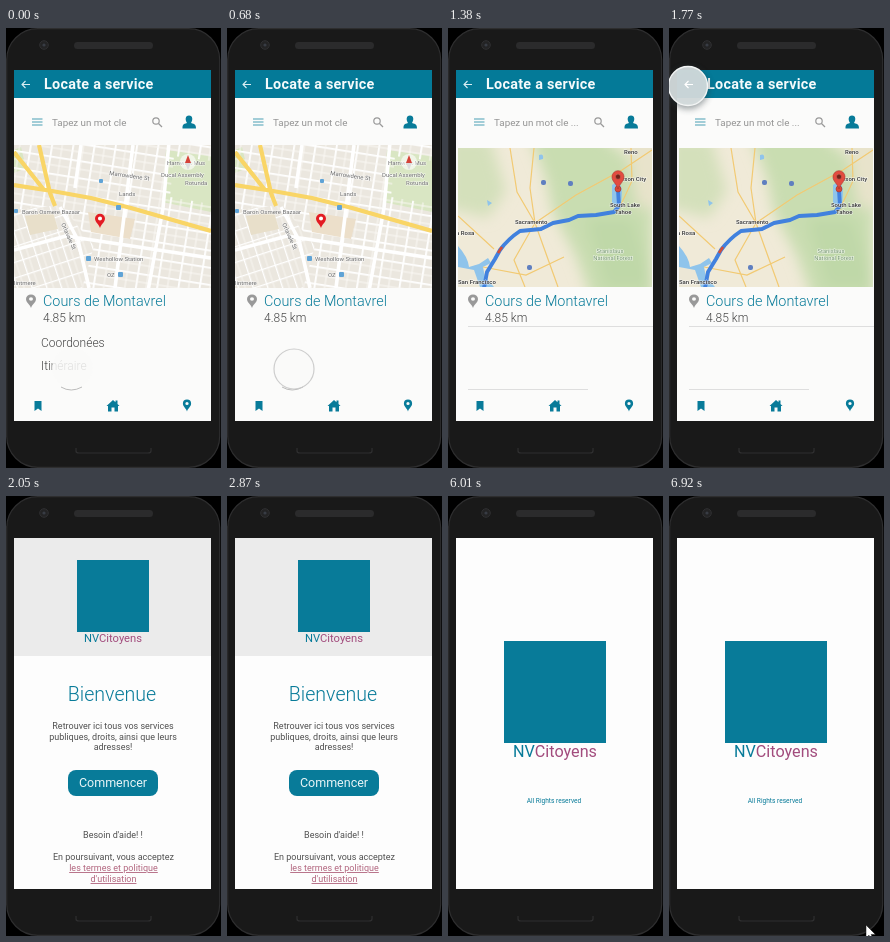
Recreate the animation shown at these times as an HTML page. Size 215 by 440 pixels, loop 8 s.

```html
<!DOCTYPE html>
<html lang="fr">
<head>
<meta charset="utf-8">
<title>Locate a service</title>
<style>
html, body { margin: 0; width: 100%; height: 100%; overflow: hidden; background: #000; }
svg.stage { display: block; width: 100vw; height: 100vh; }
text { font-family: Roboto, "Open Sans", sans-serif; }

.teal { fill: #087b99; }
.plum { fill: #a24c7d; }
.label { font-size: 6px; fill: #6b6b6b; paint-order: stroke; stroke: #fff; stroke-width: 1.2px; stroke-opacity: .7; }
.city { font-weight: 500; fill: #333; }
.forest { fill: #71936c; text-anchor: middle; font-size: 5.8px; }
.body { font-size: 9px; fill: #505050; text-anchor: middle; }
.link { fill: #b2667f; text-decoration: underline; }
.row { font-size: 12px; fill: #454545; }
.brand { text-anchor: middle; }

/* Every change is a hard cut on one shared clock */
.cut { animation: 8s step-end infinite; visibility: hidden; }
.service { animation-name: service; }
.city-map { animation-name: city-map; }
.route-map { animation-name: route-map; }
.rows { animation-name: rows; }
.press { animation-name: city-map; }
.press-rim { animation-name: press-rim; }
.ring { animation-name: ring; }
.back-tap { animation-name: back-tap; }
.welcome { animation-name: welcome; }
.splash { animation-name: splash; }
.cursor { animation-name: cursor; }
@keyframes service { 0% { visibility: visible } 25.625% { visibility: hidden } }
@keyframes city-map { 0% { visibility: visible } 11.875% { visibility: hidden } }
@keyframes route-map { 0% { visibility: hidden } 11.875% { visibility: visible } 25.625% { visibility: hidden } }
@keyframes rows { 0% { visibility: visible } 8.5% { visibility: hidden } }
@keyframes press-rim { 0% { visibility: hidden } 3.375% { visibility: visible; stroke-opacity: .45 } 8.5% { visibility: visible; stroke-opacity: .9 } 11.875% { visibility: hidden } }
@keyframes ring { 0% { visibility: hidden } 11.875% { visibility: visible } 14% { visibility: hidden } }
@keyframes back-tap { 0% { visibility: hidden } 22.125% { visibility: visible } 25.625% { visibility: hidden } }
@keyframes welcome { 0% { visibility: hidden } 25.625% { visibility: visible } 75.125% { visibility: hidden } }
@keyframes splash { 0% { visibility: hidden } 75.125% { visibility: visible } }
@keyframes cursor {
  0% { visibility: hidden; transform: translate(88px, 434px) }
  81.875% { visibility: visible; transform: translate(88px, 433px) }
  83.4% { visibility: visible; transform: translate(140px, 432px) }
  85% { visibility: visible; transform: translate(179px, 430px) }
  86.5%, 100% { visibility: visible; transform: translate(197px, 429px) }
}
</style>
</head>
<body>
<svg class="stage" viewBox="0 0 215 440" preserveAspectRatio="none">
<defs>
  <pattern id="blocks" width="21" height="17" patternUnits="userSpaceOnUse" patternTransform="rotate(9)">
    <path d="M0 0H21M0 0V17" stroke="#fff" stroke-width="3.6"/>
    <path d="M0 9H21M11 0V17" stroke="#faf8f4" stroke-width="1"/>
  </pattern>
  <pattern id="lanes" width="14" height="15" patternUnits="userSpaceOnUse" patternTransform="rotate(-18)">
    <path d="M0 0H14M0 0V15" stroke="#fff" stroke-width="2.6"/>
    <path d="M7 0V15" stroke="#faf8f4" stroke-width=".8"/>
  </pattern>
  <clipPath id="city-box"><path d="M8 117H205V260H8Z"/></clipPath>
  <clipPath id="route-box"><path d="M10 120H204V259H10Z"/></clipPath>
  <filter id="soft" x="-50%" y="-50%" width="200%" height="200%"><feGaussianBlur stdDeviation="3"/></filter>
  <filter id="haze" x="-30%" y="-30%" width="160%" height="160%"><feGaussianBlur stdDeviation="7"/></filter>
  <path id="pin" d="M0 0C-1-4-5-6-5-10A5 5 0 0 1 5-10C5-6 1-4 0 0ZM0-12A2 2 0 0 0 0-8A2 2 0 0 0 0-12Z" fill-rule="evenodd"/>
  <path id="back" d="M24 56.5H16M19.5 53L16 56.5L19.5 60" fill="none" stroke-width="1.1"/>
</defs>

<rect width="215" height="440"/>
<rect x=".7" y=".7" width="213" height="438.6" rx="31" fill="#191919" stroke="#2e2e2f" stroke-width="1.2"/>
<rect x="68" y="14" width="79" height="7" rx="3.5" fill="#2b2b2c"/>
<circle cx="38" cy="17" r="4.3" fill="#232324" stroke="#303032"/>
<circle cx="38" cy="17" r="1.6" fill="#383c44"/>
<path d="M70 420V423Q70 425 73 425H142Q145 425 145 423V420" fill="none" stroke="#2f2f30" stroke-width="1.2"/>
<rect x="8" y="42" width="197" height="351" fill="#fdfdfd"/>

<g class="cut service">
  <rect x="8" y="42" width="197" height="351" fill="#fbfbfa"/>
  <rect x="8" y="42" width="197" height="28" fill="#047a98"/>
  <use href="#back" stroke="#d8edf2"/>
  <text x="38" y="61" font-size="14.4" font-weight="600" letter-spacing=".25" fill="#f4fafb">Locate a service</text>

  <path d="M26 91H36.5M26 94H36.5M26 97H36.5" stroke="#4b9fb4" stroke-width="1.1"/>
  <text x="46" y="97.5" font-size="9.8" fill="#949494">Tapez un mot cle<tspan class="cut route-map"> ...</tspan></text>
  <g fill="none" stroke="#999" stroke-width="1.2"><circle cx="150" cy="93" r="3.2"/><path d="M152.5 95.500L156 99"/></g>
  <path class="teal" d="M183 87.500C179 87.500 179 92 181 95C177 96 176.500 97 176.500 100.500H190C190 97 189 96 185 95C187 92 187 87.500 183 87.500Z"/>

  <use href="#pin" transform="translate(25 280) scale(1 .9)" fill="#999"/>
  <text class="teal" x="37" y="278" font-size="14.4" font-weight="300">Cours de Montavrel</text>
  <text class="row" x="37" y="293.500" font-weight="300">4.85 km</text>

  <path class="teal" d="M28.500 373H35.500V383L32 380.500L28.500 383Z"/>
  <path class="teal" d="M100.500 378L107 372L109.500 374.300V372.500H111.500V376L113.500 378H112V383.500H108.500V379.500H105.500V383.500H102V378Z"/>
  <use class="teal" href="#pin" transform="translate(181 383.500) scale(.82 .8)"/>
</g>

<g class="cut city-map">
  <g clip-path="url(#city-box)">
    <rect x="8" y="117" width="197" height="143" fill="#ebe7df"/>
    <g fill="#d9e6c3">
      <path d="M160 122L205 128V184L156 174Z"/>
      <path d="M8 240L27 234L36 260H8Z"/>
      <path d="M8 122L15 119L20 140L8 145Z"/>
    </g>
    <rect x="8" y="117" width="197" height="143" fill="url(#blocks)"/>
    <path d="M8 182L55 177L88 218L76 260H8Z" fill="#ebe7df"/>
    <path d="M8 182L55 177L88 218L76 260H8Z" fill="url(#lanes)"/>
    <path d="M168 128L205 133V176L164 169Z" fill="#d9e6c3"/>
    <path d="M82 184L129 191L124 211L85 204Z" fill="#ecdfca"/>
    <path d="M19 188L47 184L52 201L24 207Z" fill="#e8dfca"/>
    <g fill="none" stroke-linejoin="round">
      <path d="M54 179L72 212L83 260M75 117L69 160M8 222L60 208L205 230M127 117L109 260M163 114L157 180L142 263" stroke="#fff" stroke-width="3.6"/>
      <path d="M8 124L38 162M33 117L44 165L49 178M8 157L46 163L85 170L125 180L205 203" stroke="#f9d566" stroke-width="4.2"/>
    </g>
    <g class="label">
      <text x="103" y="147" transform="rotate(8 103 147)">Marrowdene St</text>
      <text x="161" y="137">Harnwick Mus</text>
      <text x="155" y="149">Ducal Assembly</text>
      <text x="179" y="157">Rotunda</text>
      <text x="113" y="168">Lands</text>
      <text x="16" y="186">Baron Osmere Bazaar</text>
      <text x="88" y="233">Wexhollow Station</text>
      <text x="101" y="249">OZ</text>
      <text x="8" y="257">lintmere</text>
      <text x="55" y="196" transform="rotate(66 55 196)">Orlavale St</text>
    </g>
    <g fill="#5fa3d6"><rect x="80" y="228" width="5" height="5" rx="1"/><rect x="112" y="244" width="5" height="5" rx="1"/><rect x="8" y="181" width="4" height="4" rx="1"/><rect x="110" y="177" width="5" height="5" rx="1"/><rect x="93" y="151" width="4" height="4" rx="1"/></g>
    <circle cx="182" cy="134" r="8" fill="#fff" opacity=".6"/>
    <path d="M182 127L185 135H179Z" fill="#d54238"/><path d="M179 135H185L182 142Z" fill="#ddd"/>
    <use href="#pin" transform="translate(94 200) scale(1 .95)" fill="#e31b23"/>
    <circle cx="94" cy="190.500" r="1.800" fill="#fff"/>
  </g>
</g>

<g class="cut rows">
  <text class="row" x="35" y="319" font-weight="300">Coordonées</text>
  <text class="row" x="35" y="341.500" font-weight="300">Itinéraire</text>
</g>
<g class="cut press">
  <circle cx="66.500" cy="340" r="20.500" fill="#fbfbfa" opacity=".85"/>
  <path d="M55 359Q65 365 76 359" fill="none" stroke="#bbb"/>
</g>
<circle class="cut press-rim" cx="67" cy="341" r="20" fill="none" stroke="#c9c9c9" stroke-width="1.200"/>

<g class="cut route-map">
  <path d="M20 298.500H205M20 361.500H140" stroke="#dedede"/>
  <g clip-path="url(#route-box)">
    <rect x="10" y="120" width="194" height="139" fill="#f0ead8"/>
    <g filter="url(#haze)">
      <path d="M80 105H150L205 150V275H145L128 228L105 185L98 150Z" fill="#c9ddb1"/>
      <path d="M0 110H42L58 163L40 190L0 180Z" fill="#d4e0bb"/>
      <path d="M176 105H215V175L190 181Z" fill="#e8e3cb"/>
      <path d="M137 190H185L205 260H157Z" fill="#bfd8a8"/>
    </g>
    <g fill="#8fc4eb">
      <path d="M10 218Q20 229 21 239L31 236L40 230L43 235L35 239L37 249L46 259H10Z"/>
      <path d="M164 157Q173 150 174 164L173 179Q166 184 164 174Z"/>
      <path d="M91 127Q96 125 95 131L91 132ZM39 172L44 175L40 178Z"/>
    </g>
    <path d="M10 239L26 242L32 259H10Z" fill="#ece7d6"/>
    <path d="M86 120L82 160L87 195L110 259M10 188L46 221M87 195L128 167L174 142L204 122M62 120L69 164L87 195M87 195L66 232L77 259M170 183L184 153L183 120M35 239L78 247L116 229" fill="none" stroke="#f2ca73" stroke-width="1.200"/>
    <path d="M36 260L39 244L47 231L52 222Q60 211 72 203L93 201L105 195L121 192L130 188L148 187L166 184L171 178L170 162" fill="none" stroke="#4181de" stroke-width="3.900" stroke-linecap="round" stroke-linejoin="round"/>
    <path d="M50 225L54 219" stroke="#d44d38" stroke-width="2.600"/>
    <g class="label city">
      <text x="176" y="126">Reno</text>
      <text x="171" y="153">arson City</text>
      <text x="67" y="195.500">Sacramento</text>
      <text x="8" y="207">a Rosa</text>
      <text x="10" y="256">San Francisco</text>
      <text x="162" y="179">South Lake</text>
      <text x="167" y="186">Tahoe</text>
    </g>
    <g class="label forest"><text x="162" y="225">Stanislaus</text><text x="165" y="232">National Forest</text></g>
    <g fill="#5f7fc0"><rect x="93" y="152" width="5" height="5" rx="2"/><rect x="120" y="153" width="5" height="5" rx="2"/><rect x="79" y="237" width="5" height="5" rx="2"/></g>
    <circle cx="170" cy="161" r="3" fill="#d94739" stroke="#9c3429" stroke-width=".6"/>
    <use href="#pin" transform="translate(170 161) scale(1.200 1.220)" fill="#e34b40" stroke="#a8342c" stroke-width=".5"/>
    <circle cx="170" cy="148.800" r="2.200" fill="#742019"/>
  </g>
</g>
<g class="cut ring" fill="none" stroke="#d8d8d8">
  <circle cx="67" cy="342" r="19.500"/>
  <path d="M58 339Q60 347 67 347T76 339"/>
</g>
<g class="cut back-tap">
  <circle cx="19" cy="60" r="21" fill="#27343a" opacity=".45" filter="url(#soft)"/>
  <circle cx="19" cy="58" r="19.500" fill="#d7dedf" fill-opacity=".93" stroke="#f3f5f5" stroke-width="1.400"/>
  <use href="#back" stroke="#fff"/>
</g>

<g class="cut welcome">
  <rect x="8" y="42" width="197" height="118" fill="#ebebeb"/>
  <rect class="teal" x="71" y="64" width="72" height="72"/>
  <text class="brand" x="107" y="146" font-size="11.200"><tspan class="teal">NV</tspan><tspan class="plum">Citoyens</tspan></text>
  <text class="teal" x="106" y="205" font-size="19.600" text-anchor="middle" font-weight="300">Bienvenue</text>
  <g class="body">
    <text x="107" y="233">Retrouver ici tous vos services</text>
    <text x="107" y="243.500">publiques, droits, ainsi que leurs</text>
    <text x="107" y="254">adresses!</text>
    <text x="107" y="342">Besoin d'aide! !</text>
    <text x="107.500" y="364">En poursuivant, vous acceptez</text>
    <text class="link" x="107.500" y="375">les termes et politique</text>
    <text class="link" x="107.500" y="386">d'utilisation</text>
  </g>
  <rect x="62" y="274" width="90" height="26" rx="8" fill="#087b99"/>
  <text x="107" y="291.300" font-size="12.500" fill="#e9f5f7" text-anchor="middle">Commencer</text>
</g>

<g class="cut splash">
  <rect class="teal" x="56" y="145" width="102" height="102"/>
  <text class="brand" x="107" y="261" font-size="16.200"><tspan class="teal">NV</tspan><tspan class="plum">Citoyens</tspan></text>
  <text class="teal" x="106" y="307" font-size="6.600" text-anchor="middle">All Rights reserved</text>
</g>

<path class="cut cursor" d="M0 0V13L3 10.200L5.100 15L7.200 14L5.200 9.400H9.400Z" fill="#fff" stroke="#111" stroke-width=".5"/>
</svg>
</body>
</html>
```
